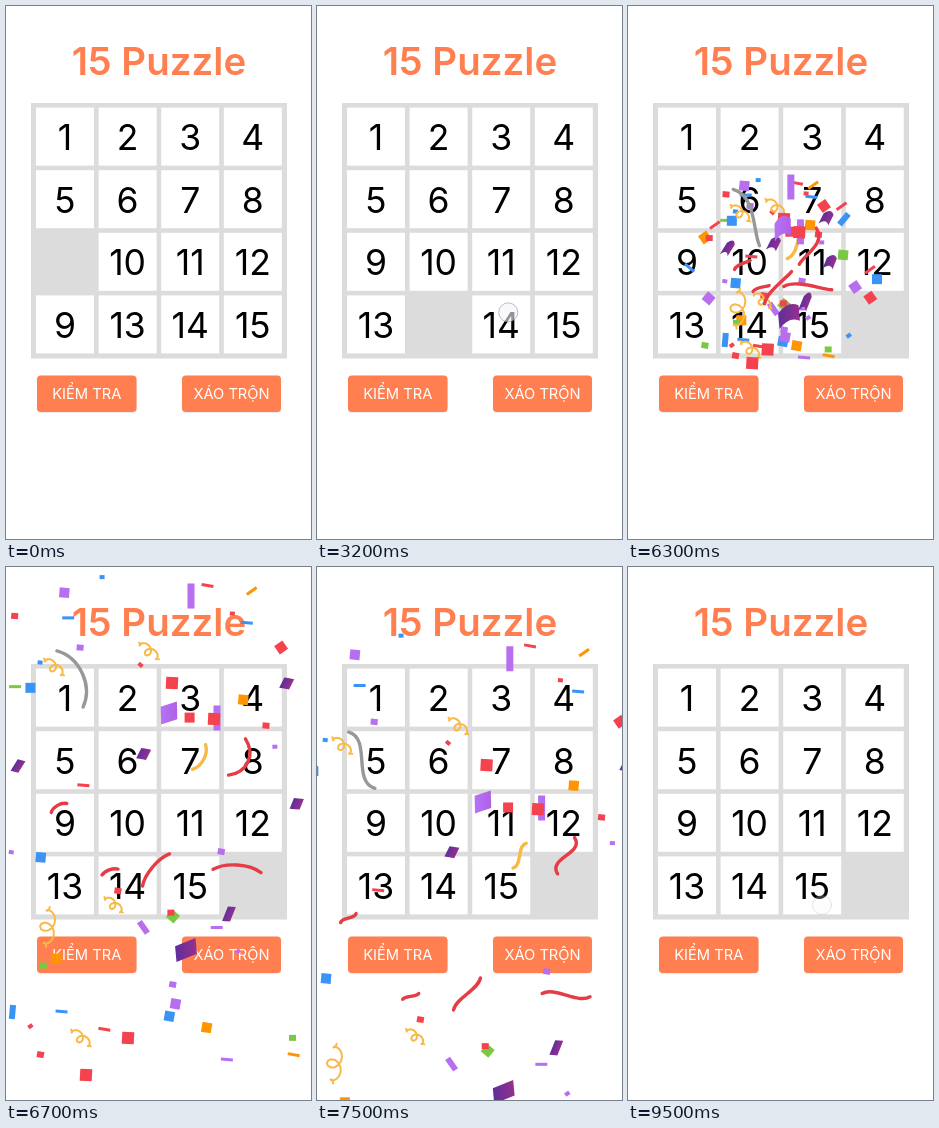
Recreate the animation shown at these times as an HTML page with a canvas. Size 305 px wide and 533 px high, loop 9600 ms.

```html
<!DOCTYPE html>
<html lang="vi">
<head>
<meta charset="utf-8">
<title>15 Puzzle</title>
<style>
html, body { margin: 0; width: 100%; height: 100%; overflow: hidden; background: #fff; }
canvas { display: block; width: 305px; height: 533px; }
</style>
</head>
<body>
<canvas id="stage"></canvas>
<script>
const W = 305, H = 533, LOOP = 9600, STEP = 100;
const FONT = 'Inter, "Open Sans", sans-serif';
const CORAL = '#ff7f50';
const BURST = 5900, CLEAR = 9100, FULL = 6700;
const ORIGIN = { x: 150, y: 275 };
const canvas = document.getElementById('stage');
const ctx = canvas.getContext('2d');
const ratio = window.devicePixelRatio || 1;
canvas.width = W * ratio;
canvas.height = H * ratio;

const moves = {
  9: { from: 12, touch: 1600, press: 1600, move: 1700 },
  13: { from: 13, touch: 2400, press: 2500, move: 2600 },
  14: { from: 14, touch: 3200, press: 3300, move: 3400 },
  15: { from: 15, touch: 4800, press: 4900, move: 4900 }
};

function seeded(seed) {
  return () => {
    seed = (seed + 0x6d2b79f5) | 0;
    let r = Math.imul(seed ^ (seed >>> 15), 1 | seed);
    r = (r + Math.imul(r ^ (r >>> 7), 61 | r)) ^ r;
    return ((r ^ (r >>> 14)) >>> 0) / 4294967296;
  };
}

const random = seeded(15);
const between = (a, b) => a + (b - a) * random();
const pick = list => list[Math.floor(random() * list.length)];

// Share of the full radius reached at time t
function spread(t) {
  const u = Math.min(1, (t - BURST) / 1100);
  return u * u * (3 - 2 * u);
}

function drop(t) {
  return 0.000107 * Math.max(0, t - BURST - 500) ** 2;
}

// Shapes, each drawn around its own centre
function paper(w, h, color) {
  return () => {
    ctx.fillStyle = color;
    ctx.fillRect(-w / 2, -h / 2, w, h);
  };
}

function sheet(w, h, left, right) {
  return t => {
    const fold = h * Math.max(0, 0.9 - spread(t) * 1.1);
    const shade = ctx.createLinearGradient(-w / 2, 0, w / 2, 0);
    shade.addColorStop(0, left);
    shade.addColorStop(1, right);
    ctx.fillStyle = shade;
    ctx.transform(1, 0, -0.3, 1, 0, 0);
    ctx.beginPath();
    ctx.moveTo(-w / 2, -h / 2);
    ctx.quadraticCurveTo(0, -h / 2 - fold, w / 2, -h / 2);
    ctx.lineTo(w / 2, h / 2);
    ctx.quadraticCurveTo(0, h / 2 - fold, -w / 2, h / 2);
    ctx.fill();
  };
}

const darkSheet = (w, h) => sheet(w, h, '#5f2f9a', '#95308f');

function ribbon(length, bend, color) {
  return t => {
    const sway = bend * Math.cos(Math.PI * (t - FULL) / 800);
    ctx.strokeStyle = color;
    ctx.lineWidth = 3.4;
    ctx.beginPath();
    ctx.moveTo(-length / 2, 0);
    ctx.bezierCurveTo(-length / 4, -bend, length / 4, -sway, length / 2, 0);
    ctx.stroke();
  };
}

function curl(length) {
  return () => {
    ctx.strokeStyle = '#f9b947';
    ctx.lineWidth = 2;
    ctx.beginPath();
    for (let i = 0; i <= 30; i++) {
      const u = i / 30, a = u * Math.PI * 5;
      const r = length * 0.2 * Math.sin(Math.PI * u);
      ctx.lineTo((u - 0.5) * length + r * Math.cos(a), r * Math.sin(a));
    }
    ctx.stroke();
  };
}

// A piece is described by where it stands when the burst is at FULL
function piece(x, y, degrees, draw) {
  const k = 1 / spread(FULL);
  return {
    dx: (x - ORIGIN.x) * k,
    dy: (y - drop(FULL) - ORIGIN.y) * k,
    angle: degrees * Math.PI / 180,
    draw
  };
}

const COLORS = ['#f5424f', '#f5424f', '#3a93f5', '#3a93f5', '#7ac943', '#ff9500', '#b76ff0'];

function randomShape() {
  const color = pick(COLORS), kind = random();
  if (kind < 0.26) return paper(10, 10, color);
  if (kind < 0.48) return paper(7, 6, color);
  if (kind < 0.66) return paper(5, 4, color);
  if (kind < 0.82) return paper(12, 3, color);
  if (kind < 0.88) return paper(6, 14, color);
  if (kind < 0.94) return darkSheet(10, 11);
  return curl(between(20, 28));
}

function scatter() {
  const a = between(0, 2 * Math.PI), r = 275 * Math.sqrt(random());
  return piece(ORIGIN.x + r * Math.cos(a), ORIGIN.y + r * Math.sin(a),
    pick([0, 5, 10, 40, -35]), randomShape());
}

// Large pieces have set places; the small ones are scattered
const RED = '#e63c46';
const pieces = [
  ...Array.from({ length: 60 }, scatter),
  piece(48, 100, 40, curl(26)),
  piece(143, 84, 40, curl(26)),
  piece(42, 360, 95, curl(40)),
  piece(75, 471, 40, curl(26)),
  piece(193, 190, -62, ribbon(28, -7, '#f9b947')),
  piece(64, 112, 65, ribbon(62, 18, '#989898')),
  piece(231, 190, 115, ribbon(40, 16, RED)),
  piece(53, 241, -30, ribbon(18, 4, RED)),
  piece(104, 305, -20, ribbon(17, 3, RED)),
  piece(150, 303, -50, ribbon(42, 6, RED)),
  piece(231, 304, 4, ribbon(48, 8, RED)),
  piece(185, 29, 0, paper(7, 25, '#b76ff0')),
  piece(211, 151, 0, paper(7, 25, '#b76ff0')),
  piece(166, 116, 3, paper(12, 12, '#f5424f')),
  piece(208, 152, 3, paper(12, 12, '#f5424f')),
  piece(122, 471, 3, paper(12, 12, '#f5424f')),
  piece(80, 508, 3, paper(12, 12, '#f5424f')),
  piece(163, 146, -18, sheet(17, 17, '#b574f5', '#b060e8')),
  piece(180, 383, -22, darkSheet(22, 15)),
  piece(12, 199, 15, darkSheet(8, 13)),
  piece(223, 347, 5, darkSheet(8, 15))
];

function confetti(t) {
  const e = spread(t), fall = drop(t);
  const tilt = 0.25 * Math.sin(Math.PI * (t - FULL) / 400);
  ctx.lineJoin = 'round';
  ctx.lineCap = 'round';
  for (const p of pieces) {
    ctx.save();
    ctx.translate(ORIGIN.x + p.dx * e, ORIGIN.y + p.dy * e + fall);
    ctx.rotate(p.angle + tilt);
    p.draw(t);
    ctx.restore();
  }
}

function label(text, x, y, size, weight, color) {
  ctx.font = `${weight} ${size}px ${FONT}`;
  ctx.fillStyle = color;
  ctx.fillText(text, x, y);
}

function corner(cell) {
  return [30 + 62.6 * (cell % 4), 101.6 + 62.6 * Math.floor(cell / 4)];
}

function tile(n, t) {
  const m = moves[n];
  const [x, y] = corner(m && t < m.move ? m.from : n - 1);
  ctx.save();
  if (m && t >= m.press && t < m.move + STEP) {
    ctx.globalAlpha = t < m.move ? 0.28 : 0.75;
  }
  ctx.fillStyle = '#fff';
  ctx.fillRect(x, y, 58, 58);
  label(n, x + 29, y + 42.4, 35.5, 400, '#000');
  ctx.restore();
}

function button(text, x, w) {
  ctx.save();
  ctx.shadowColor = 'rgba(0,0,0,0.15)';
  ctx.shadowBlur = ratio;
  ctx.shadowOffsetY = ratio / 2;
  ctx.fillStyle = CORAL;
  ctx.beginPath();
  ctx.roundRect(x, 369.5, w, 36.5, 4);
  ctx.fill();
  ctx.restore();
  label(text, x + w / 2, 393, 14.7, 400, '#fff');
}

function touch(x, y, alpha) {
  ctx.save();
  ctx.globalAlpha = alpha;
  ctx.beginPath();
  ctx.arc(x, y, 9.5, 0, 7);
  ctx.fillStyle = 'rgba(245,245,250,0.6)';
  ctx.fill();
  ctx.strokeStyle = 'rgba(140,135,165,0.55)';
  ctx.lineWidth = 1;
  ctx.stroke();
  ctx.restore();
}

function render(t) {
  ctx.setTransform(ratio, 0, 0, ratio, 0, 0);
  ctx.fillStyle = '#fff';
  ctx.fillRect(0, 0, W, H);
  ctx.textAlign = 'center';
  label('15 Puzzle', 153, 69, 38.5, 600, CORAL);
  ctx.fillStyle = '#dcdcdc';
  ctx.fillRect(25, 97, 256, 255.5);
  for (let n = 1; n <= 15; n++) tile(n, t);
  button('KIỂM TRA', 31, 99.5);
  button('XÁO TRỘN', 176, 99);
  for (const m of Object.values(moves)) {
    if (t < m.touch || t >= m.move + STEP) continue;
    const [x, y] = corner(m.from);
    touch(x + 36, y + 17, t < m.move ? 1 : 0.5);
  }
  if (t >= 9400) touch(194, 338, t < 9500 ? 0.6 : 0.4);
  if (t >= BURST && t < CLEAR) confetti(t);
}

const start = performance.now();
function tick() {
  const t = (performance.now() - start) % LOOP;
  render(Math.floor(t / STEP) * STEP);
  requestAnimationFrame(tick);
}
tick();
</script>
</body>
</html>
```
